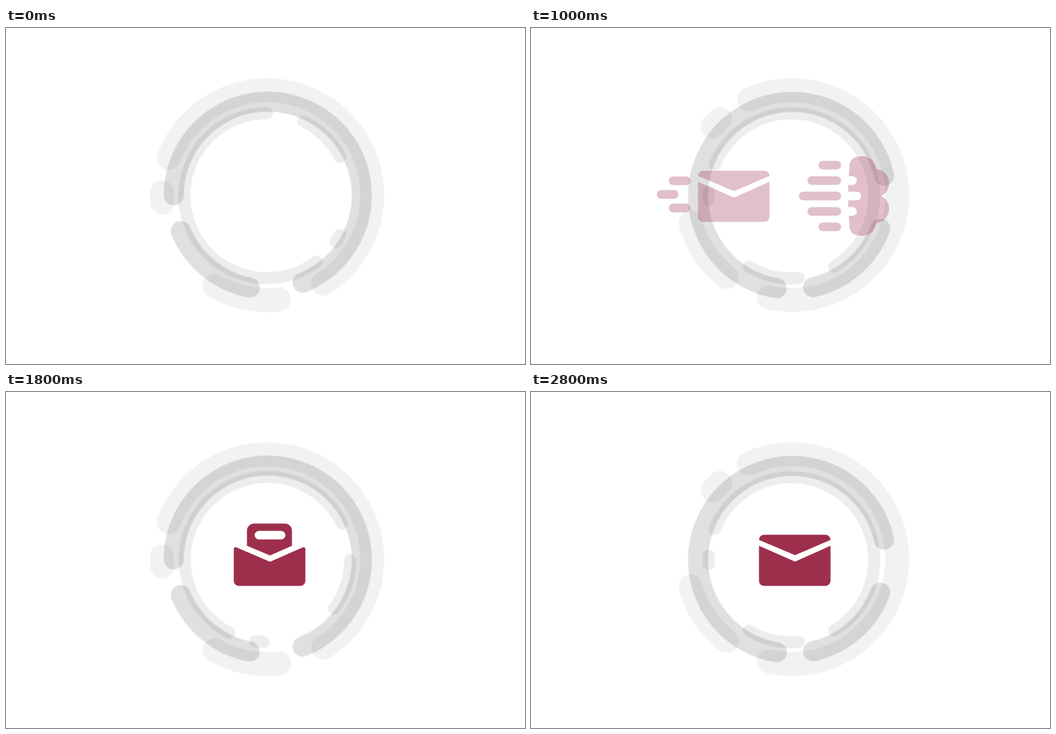
An HTML page that plays this animation: 800x519 px, repeating every 3000 ms.

```html
<!DOCTYPE html>
<html lang="en">
<head>
<meta charset="utf-8">
<title>Mail delivery</title>
<style>
  html, body { margin: 0; width: 100%; height: 100%; overflow: hidden; background: #fff; }
  svg { display: block; width: 800px; height: 519px; }
  .ring { fill: none; stroke: #000; stroke-linecap: round; }
  .icon { fill: #9d2f4c; }
  .hole { fill: #fff; }
</style>
</head>
<body>
<svg id="stage" viewBox="0 0 800 519"></svg>
<script>
const STEPS = 15, DURATION = 3000, MID_Y = 259.5;
const stage = document.getElementById('stage');
const rad = deg => deg * Math.PI / 180;

function add(parent, tag, attrs) {
  const el = document.createElementNS('http://www.w3.org/2000/svg', tag);
  for (const key in attrs) el.setAttribute(key, attrs[key]);
  return parent.appendChild(el);
}

const path = (parent, d) => add(parent, 'path', { d });

// Horizontal bar with round ends, centred on y.
const bar = (parent, x1, x2, y, cls = '') =>
  add(parent, 'rect', { x: x1, y: y - 6.65, width: x2 - x1, height: 13.3, rx: 6.65, class: cls });

// Plays one held keyframe per step.
function play(el, frameAt) {
  const frames = Array.from({ length: STEPS + 1 }, (_, i) => ({
    ...frameAt(Math.min(i, STEPS - 1)), offset: i / STEPS, easing: 'step-end'
  }));
  el.animate(frames, { duration: DURATION, iterations: Infinity }).startTime = 0;
}

function arc(r, from, to) {
  const point = deg => `${r * Math.cos(rad(deg))} ${r * Math.sin(rad(deg))}`;
  return `M${point(from)}A${r} ${r} 0 ${+(to - from > 180)} 1 ${point(to)}`;
}

// Cycles through three turns while the centre sways along a short diagonal.
function ring({ r, width, opacity, arcs, turns, x, y, sway = 0, phase = 0, poseAt = i => i % 3 }) {
  const g = add(stage, 'g', { class: 'ring', 'stroke-width': width, 'stroke-opacity': opacity });
  arcs.forEach(([from, to]) => path(g, arc(r, from, to)));
  play(g, i => {
    const pose = poseAt(i);
    const shift = sway * Math.cos(rad(120 * pose + phase));
    return { transform: `translate(${x + shift}px, ${y - 0.4 * shift}px) rotate(${turns[pose]}deg)` };
  });
}

const threeArcs = [[0, 217], [-24.8, -19.1], [-117.2, -80.9]];
const twoArcs = [[0, 248.3], [-78.9, -22.3]];
ring({ r: 162, width: 37, opacity: 0.05, arcs: threeArcs, turns: [200.7, 80.7, 245.8], x: 402.4, y: 258.1 });
ring({ r: 145, width: 31, opacity: 0.122, arcs: twoArcs, turns: [180, 269.2, 99.4],
  x: 402.2, y: 259.2, sway: 1.75, phase: 41 });
// The inner ring lingers in its second pose as the letter opens.
ring({ r: 127.5, width: 18.6, opacity: 0.071, arcs: threeArcs, turns: [53.1, 117.5, 202],
  x: 402.3, y: 258.9, sway: 0.9, phase: -79, poseAt: i => i === 9 ? 1 : i % 3 });

function icon(frameAt) {
  const g = add(stage, 'g', { class: 'icon' });
  play(g, frameAt);
  return g;
}

// Glides in and out at an even speed, most solid at the peak step.
const flight = (first, last, peak, speed, rest) => icon(i => {
  const away = Math.abs(i - peak);
  return {
    opacity: i < first || i > last ? 0 : 1 - 0.25 * away - 0.05 * away ** 2,
    transform: `translate(${rest + speed * (i - peak)}px, 0px)`
  };
});

const brain = flight(1, 5, 3, 41, 41);
for (let row = -2; row <= 2; row++) {
  const k = Math.abs(row);
  bar(brain, 290 + 11 * k + 2 * k ** 2, 355, MID_Y + 23.8 * row);
}
const upper = [[366.8, 228.9], [368, 211], [369, 202], [377, 198], [387.5, 198], [399, 198], [407, 206],
  [409.5, 217.5], [421, 219], [429, 228.5], [429, 240], [429, 248], [424.5, 255.5], [417, MID_Y]];
const lower = upper.slice(0, -1).reverse().map(([x, y]) => [x, 2 * MID_Y - y]);
const notches = [1, 0, -1].map(row =>
  `V${MID_Y + 23.8 * row + 6.7}H${379.3 - 6.8 * Math.abs(row)}a6.7 6.7 0 0 0 0-13.4H366`).join('');
path(brain, `M${upper[0]}L${upper[1]}C${upper.slice(2).join(' ')} ${lower.slice(0, -1).join(' ')}
  L${lower.at(-1)}${notches}Z`);

function closedEnvelope(g) {
  path(g, 'M351.4 228.4a8 8 0 0 1 8-8H453.7a8 8 0 0 1 8 8L407 252Z');
  path(g, 'M351.4 237.6L407 262L461.7 237.6V291.6a8 8 0 0 1-8 8H359.4a8 8 0 0 1-8-8Z');
}

function openEnvelope(g, lines) {
  const top = 229.4 - 26.2 * lines;
  path(g, `M371.4 237.5V${top + 11}a11 11 0 0 1 11-11H429.8a11 11 0 0 1 11 11V237.5L407 252.4Z`);
  for (let n = 0; n < lines; n++) bar(g, 383.3, 430.7, top + 17.9 + 20.9 * n, 'hole');
  path(g, `M351.1 243.4Q351.1 238.4 355.8 240.2L407 262.2L456.8 240.2Q461.5 238.4 461.5 243.4
    V291.6a8 8 0 0 1-8 8H359.1a8 8 0 0 1-8-8Z`);
}

const flying = flight(5, 7, 7, 47, 0);
for (let row = -1; row <= 1; row++) {
  const start = 287.8 + 18.7 * Math.abs(row);
  bar(flying, start, start + 33.4, 257 + 21 * row);
}
closedEnvelope(flying);

// The letter rises line by line, then sinks back.
for (let lines = 0; lines <= 3; lines++) {
  const g = icon(i => ({ opacity: +(3 - Math.abs(i - 11) === lines) }));
  if (lines) openEnvelope(g, lines);
  else closedEnvelope(g);
}
</script>
</body>
</html>
```
